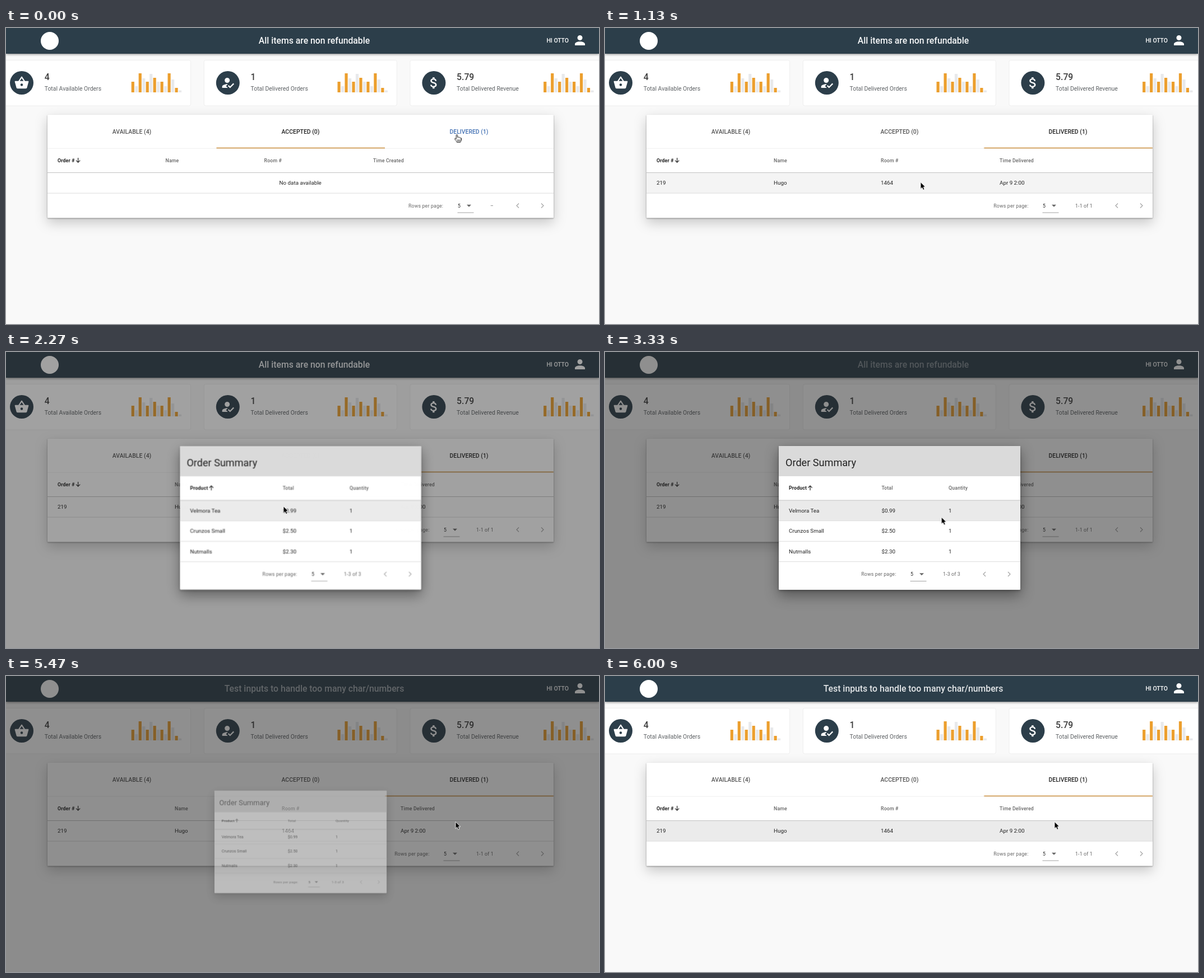
An HTML page that plays this animation: 1058 by 529 pixels, repeating every 6.07 s.

```html
<!DOCTYPE html>
<html lang="en">
<head>
<meta charset="utf-8">
<title>Orders dashboard</title>
<style>
  html, body { margin: 0; width: 100%; height: 100%; overflow: hidden; background: #f9f9f9; }
  svg { display: block; width: 1058px; height: 529px; font-family: Roboto, Arial, sans-serif; }
  .title { font-size: 15.75px; font-weight: 500; fill: #f7f8f9; }
  .user { font-size: 10.45px; font-weight: 500; fill: #fff; }
  .count { font-size: 15.7px; font-weight: 500; fill: #3c3c3c; }
  .label { font-size: 10.45px; fill: #5d6164; }
  .tab { font-size: 10.45px; font-weight: 500; fill: #555; }
  .th, .sorted, .foot { font-size: 8.75px; letter-spacing: .02em; fill: #666; }
  .th { font-weight: 500; }
  .sorted { font-weight: 700; fill: #222; }
  .td { font-size: 9.8px; fill: #222; }
  .heading { font-size: 18.1px; fill: #222; }
  .page { filter: drop-shadow(0 1px 1px #0006) drop-shadow(0 8px 11px #0003); }
  .sheet { filter: drop-shadow(0 2px 2px #0004) drop-shadow(0 9px 12px #0006); }
  .bar { filter: drop-shadow(0 1px 2px #0007); }
  #dialog { transform-origin: 525.5px 296.5px; }
</style>
</head>
<body>
<svg id="stage" viewBox="0 0 1058 529">
  <clipPath id="body"><rect x="74" y="216" width="903" height="124"/></clipPath>
</svg>
<script>
const LOOP = 6070;
const NAVY = '#2c3e4a';
const stage = document.getElementById('stage');

const ICONS = {
  user: 'M12 4a4 4 0 0 1 0 8 4 4 0 0 1 0-8m0 10c4.42 0 8 1.79 8 4v2H4v-2c0-2.21 3.58-4 8-4z',
  basket: 'M17.21 9l-4.38-6.56a1 1 0 0 0-1.66 0L6.79 9H2c-.55 0-1 .45-1 1l.04.27 2.54 9.27c.23.84 1 1.46 1.92 1.46h13c.92 0 1.69-.62 1.93-1.46l2.54-9.27L23 10c0-.55-.45-1-1-1zM9 9l3-4.4L15 9zm3 8a2 2 0 0 1 0-4 2 2 0 0 1 0 4z',
  check: 'M9 17l3-2.94c-.39-.04-.68-.06-1-.06-2.67 0-8 1.34-8 4v2h9zm2-5a4 4 0 0 0 0-8 4 4 0 0 0 0 8m4.47 8.5L12 17l1.4-1.41 2.07 2.08 5.13-5.17 1.4 1.41z',
  dollar: 'M11.8 10.9c-2.27-.59-3-1.2-3-2.15 0-1.09 1.01-1.85 2.7-1.85 1.78 0 2.44.85 2.5 2.1h2.21c-.07-1.72-1.12-3.3-3.21-3.81V3h-3v2.16c-1.94.42-3.5 1.68-3.5 3.61 0 2.31 1.91 3.46 4.7 4.13 2.5.6 3 1.48 3 2.41 0 .69-.49 1.79-2.7 1.79-2.06 0-2.87-.92-2.98-2.1h-2.2c.12 2.19 1.76 3.42 3.68 3.83V21h3v-2.15c1.95-.37 3.5-1.5 3.5-3.55 0-2.84-2.43-3.81-4.7-4.4z'
};

// Drawing helpers
function add(parent, tag, attrs = {}) {
  const el = document.createElementNS('http://www.w3.org/2000/svg', tag);
  for (const key in attrs) el.setAttribute(key, attrs[key]);
  return parent.appendChild(el);
}
const group = (parent, attrs) => add(parent, 'g', attrs);
const rect = (parent, x, y, width, height, fill, more) =>
  add(parent, 'rect', { x, y, width, height, fill, ...more });
const path = (parent, d, attrs) => add(parent, 'path', { d, ...attrs });
const line = (parent, d, stroke, width = 1) =>
  path(parent, d, { fill: 'none', stroke, 'stroke-width': width });
function text(parent, x, y, str, cls, anchor = 'start') {
  const el = add(parent, 'text', { x, y, class: cls, 'text-anchor': anchor });
  el.textContent = str;
  return el;
}
const icon = (parent, name, x, y) => path(parent, ICONS[name], {
  fill: '#fff', 'fill-rule': 'evenodd',
  transform: `translate(${x - 13.5} ${y - 13.5}) scale(1.125)`
});

// Steps are [ms, value, easing to the next step]
function play(el, prop, steps) {
  const all = [[0, steps[0][1]], ...steps, [LOOP, steps.at(-1)[1]]];
  el.animate(
    all.map(([ms, value, easing = 'linear']) => ({ offset: ms / LOOP, [prop]: value, easing })),
    { duration: LOOP, iterations: Infinity }
  );
}
const move = (x, y = 0) => `translate(${x}px, ${y}px)`;
const SLIDE = 'cubic-bezier(.25,.8,.5,1)';
const POP = 'cubic-bezier(.25,.8,.25,1)';

function footer(parent, y, labelX, fiveX, rangeX, range, prevX) {
  text(parent, labelX, y + 3, 'Rows per page:', 'foot');
  text(parent, fiveX, y + 3, '5', 'foot').style.fill = '#222';
  path(parent, `M${fiveX + 16} ${y - 1.7}h8l-4 4z`, { fill: '#666' });
  line(parent, `M${fiveX - .5} ${y + 12.5}h29`, '#8a8a8a', .8);
  text(parent, rangeX, y + 3, range, 'foot');
  line(parent, `M${prevX + 2} ${y - 4}l-4 4 4 4M${prevX + 42} ${y - 4}l4 4-4 4`, '#a3a3a3', 1.2);
}

function table(parent, columns, labels) {
  labels.forEach((label, i) => text(parent, columns[i], 240, label, i ? 'th' : 'sorted'));
  line(parent, 'M128.6 232v8M125 236.6l3.6 3.6 3.6-3.6', '#222', 1.2);
  line(parent, 'M74 258.5H977', '#c2c2c2');
  line(parent, 'M74 295.2H977', '#dcdcdc');
}

// Header
rect(stage, 0, 0, 1058, 46, NAVY, { class: 'bar' });
add(stage, 'circle', { cx: 78, cy: 23, r: 16, fill: '#fff' });
const oldTitle = text(stage, 550, 28, 'All items are non refundable', 'title', 'middle');
const newTitle = text(stage, 550, 28, 'Test inputs to handle too many char/numbers', 'title', 'middle');
text(stage, 1004, 25.7, 'HI OTTO', 'user', 'end');
icon(stage, 'user', 1024, 22);

// Summary cards
const BARS = [19, 11, 34, 25, 19, 33, 26, 19, 19, 11, 34, 23, 8, 3.5];
[
  [0, 'basket', '4', 'Total Available Orders'],
  [367.8, 'check', '1', 'Total Delivered Orders'],
  [735.4, 'dollar', '5.79', 'Total Delivered Revenue']
].forEach(([x, name, count, label]) => {
  const card = group(stage, { transform: `translate(${x} 0)` });
  rect(card, -14.5, 57.5, 344, 81.5, '#fff', { rx: 3, stroke: '#eee' });
  add(card, 'circle', { cx: 28, cy: 98, r: 21, fill: NAVY });
  icon(card, name, 28, 98);
  text(card, 68.7, 93.3, count, 'count');
  text(card, 68.7, 112, label, 'label');
  BARS.forEach((h, i) =>
    rect(card, 223.7 + i * 6.48, 115 - h, 5.2, h, i % 2 ? '#e8e9eb' : '#ec9f2e'));
});

// Orders card
rect(stage, 74, 155, 903, 184.5, '#fff', { class: 'page', rx: 1 });
text(stage, 224.5, 188.8, 'AVAILABLE (4)', 'tab', 'middle');
const accepted = text(stage, 525.5, 188.8, 'ACCEPTED (0)', 'tab', 'middle');
const delivered = text(stage, 826, 188.8, 'DELIVERED (1)', 'tab', 'middle');
line(stage, 'M74 215.2H977', '#ececec', .8);
const slider = rect(stage, 375.5, 213.6, 300.5, 1.7, '#cf9a50');

const body = group(stage, { 'clip-path': 'url(#body)' });
const emptyTab = group(body);
table(emptyTab, [92, 284.5, 460.5, 655], ['Order #', 'Name', 'Room #', 'Time Created']);
text(emptyTab, 525.2, 279.7, 'No data available', 'td', 'middle');
footer(emptyTab, 317.5, 718, 806, 864, '–', 913);

const fullTab = group(body);
const orderRow = rect(fullTab, 74, 259, 903, 36, '#000');
table(fullTab, [92, 301, 492, 704], ['Order #', 'Name', 'Room #', 'Time Delivered']);
['219', 'Hugo', '1464', 'Apr 9 2:00'].forEach((cell, i) =>
  text(fullTab, [92, 301, 492, 704][i], 279.7, cell, 'td'));
footer(fullTab, 317.5, 693.3, 781, 839, '1-1 of 1', 913);

// Dialog
const scrim = rect(stage, 0, 0, 1058, 529, '#212121');
const dialog = group(stage, { id: 'dialog' });
rect(dialog, 310, 168, 431, 257, '#fff', { class: 'sheet', rx: 1.5 });
rect(dialog, 310, 168, 431, 54, '#dadada');
text(dialog, 322, 204.3, 'Order Summary', 'heading');
const COLS = [328, 493.5, 613];
['Product', 'Total', 'Quantity'].forEach((label, i) =>
  text(dialog, COLS[i], 246.3, label, i ? 'th' : 'sorted'));
line(dialog, 'M366 247.2v-8M362.4 242.6l3.6-3.6 3.6 3.6', '#222', 1.2);
const itemRows = [
  ['Velmora Tea', '$0.99', '1'],
  ['Crunzos Small', '$2.50', '1'],
  ['Nutmalls', '$2.30', '1']
].map((cells, r) => {
  const y = 265 + r * 36.6;
  const hover = rect(dialog, 310, y, 431, 36.6, '#000');
  cells.forEach((cell, i) => text(dialog, COLS[i], y + 21.8, cell, 'td'));
  return hover;
});
line(dialog, 'M310 265H741', '#c2c2c2');
line(dialog, 'M310 301.7H741M310 338.3H741M310 374.7H741', '#dcdcdc');
footer(dialog, 397, 457.3, 545, 603, '1-3 of 3', 677);

// Pointer
const pointer = group(stage);
const arrow = path(pointer, 'M0 0V12.2L2.8 9.7 4.7 14 7 13 5.1 8.8H8.9Z',
  { fill: '#000', stroke: '#fff', 'stroke-width': .9, 'stroke-linejoin': 'round' });
const hand = path(pointer,
  'M-1.2 1C-1.2-.5 1-.5 1 1V5C1 4 3.2 4 3.2 5.3 3.6 4.5 5.3 4.7 5.4 5.9 6 5.3 7.5 5.6 7.5 7V9.5C7.5 11 6.5 11.5 6.3 13.2H-.2C-.4 11.6-3.4 9.4-4 7.9-4.4 6.7-3 6.3-2.2 7.2L-1.2 8.2ZM1.2 9v2.5M3.1 9v2.5M5 9v2.5',
  { fill: '#fff', stroke: '#000', 'stroke-width': .9, 'stroke-linejoin': 'round' });

// Motion
play(oldTitle, 'opacity', [[2130, 1], [4250, 0]]);
play(newTitle, 'opacity', [[4470, 0], [6070, .95]]);

play(delivered, 'fill', [[140, '#4472b4'], [270, '#222']]);
play(accepted, 'fill', [[140, '#222'], [270, '#555']]);
play(slider, 'transform', [[140, move(0), SLIDE], [440, move(300.8)]]);
play(emptyTab, 'transform', [[140, move(0), SLIDE], [440, move(-903)]]);
play(fullTab, 'transform', [[140, move(903), SLIDE], [440, move(0)]]);

play(orderRow, 'opacity', [[950, 0], [1100, .045], [2170, .045], [2300, 0], [5640, 0], [5730, .08]]);
play(itemRows[0], 'opacity', [[3390, .08], [3500, 0]]);
play(itemRows[1], 'opacity', [[3390, 0], [3470, .08], [3540, .08], [3640, 0], [3850, 0], [3950, .08], [4560, .08], [4700, 0]]);
play(itemRows[2], 'opacity', [[3540, 0], [3620, .08], [3850, .08], [3950, 0]]);

play(scrim, 'opacity', [[2135, 0, SLIDE], [2435, .5], [5555, .5, SLIDE], [5855, 0]]);
play(dialog, 'opacity', [[2013, 0, POP], [2313, 1], [5415, 1, POP], [5715, 0]]);
play(dialog, 'transform', [[2013, 'scale(.5)', POP], [2313, 'scale(1)'], [5415, 'scale(1)', POP], [5715, 'scale(.5)']]);

play(pointer, 'transform', [
  [500, move(804.5, 190.5), 'ease-in-out'], [1100, move(563, 275.5)],
  [1400, move(563, 275.5), 'ease-in-out'], [1900, move(495, 275.5)],
  [2730, move(495, 276), 'ease-in'], [3330, move(600, 295)],
  [3720, move(700, 353), 'ease-out'], [4000, move(730, 331.5)],
  [4470, move(730, 331.5), 'ease-in-out'], [5130, move(802, 260.5)]
]);
play(hand, 'opacity', [[0, 1, 'steps(1)'], [750, 0]]);
play(arrow, 'opacity', [[0, 0, 'steps(1)'], [750, 1]]);
</script>
</body>
</html>
```
